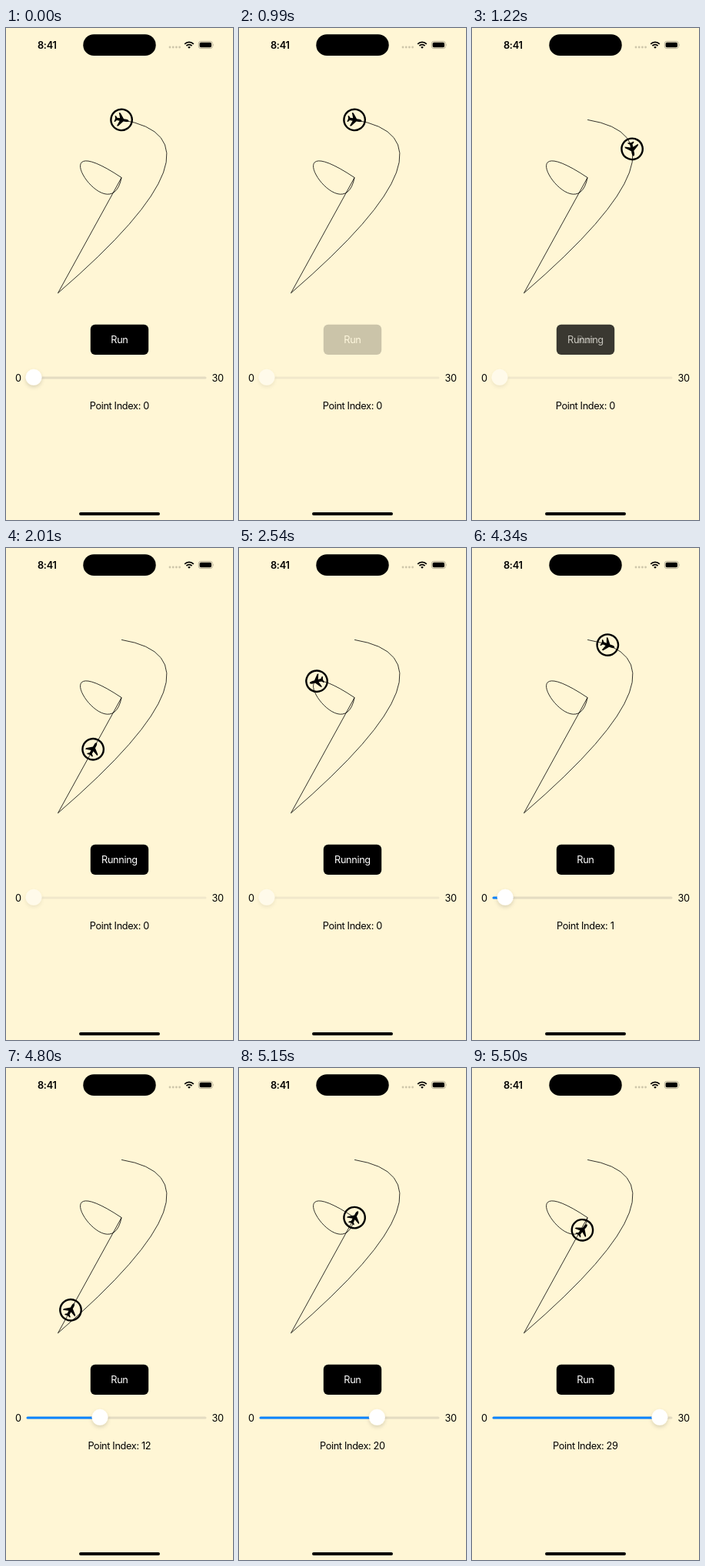
Animation of 295x640 px, one loop 6890 ms. Source, as an HTML page:

```html
<!DOCTYPE html>
<html lang="en">
<head>
<meta charset="utf-8">
<title>Path follower</title>
<style>
  html, body { margin: 0; width: 100%; height: 100%; overflow: hidden; background: #fff6d5; }
  svg { display: block; width: 295px; height: 640px; }
  text { font: 12.76px Inter, Roboto, sans-serif; letter-spacing: -.36px; text-anchor: middle; }
  #button text { fill: #fff; }
</style>
</head>
<body>
<svg viewBox="0 0 295 640">
  <defs>
    <filter id="shadow" x="-60%" y="-60%" width="220%" height="240%">
      <feDropShadow dx="0" dy="2.5" stdDeviation="2.8" flood-opacity=".15"/>
    </filter>
  </defs>

  <!-- Status bar -->
  <text x="53.3" y="26.6" style="font-weight:600; letter-spacing:-.25px">8:41</text>
  <rect x="100.3" y="8.3" width="94.4" height="27.8" rx="13.9"/>
  <g fill="#cec6aa">
    <circle cx="213" cy="25" r="1.4"/><circle cx="217.2" cy="25" r="1.4"/>
    <circle cx="221.4" cy="25" r="1.4"/><circle cx="225.6" cy="25" r="1.4"/>
  </g>
  <g fill="none" stroke="#000" stroke-width="1.8">
    <path d="M232.2 20.8a8.3 8.3 0 0 1 11.6 0M234.4 23.2a5.2 5.2 0 0 1 7.2 0"/>
    <path d="M238 26.8l-1.8-1.9a2.6 2.6 0 0 1 3.6 0z" fill="#000" stroke="none"/>
  </g>
  <rect x="250.3" y="17.4" width="18" height="9.2" rx="2.8" fill="none" stroke="#a59e88" stroke-width=".8"/>
  <rect x="251.6" y="18.7" width="15.4" height="6.6" rx="1.7"/>
  <path d="M269.5 20.5q1.3 1.5 0 3z" fill="#a59e88"/>

  <path id="route" fill="none" stroke="#000" stroke-width=".8"/>
  <g id="plane">
    <circle r="13.7" fill="none" stroke="#000" stroke-width="2.4"/>
    <path d="M9.5 0C9.5-1 7.6-1.7 6-1.7H2.7L-2.6-8.3Q-3-8.8-3.6-8.8H-4.8L-2.2-1.7H-6L-7.8-4H-9.2L-8.2 0
      L-9.2 4H-7.8L-6 1.7H-2.2L-4.8 8.8H-3.6Q-3 8.8-2.6 8.3L2.7 1.7H6C7.6 1.7 9.5 1 9.5 0Z"/>
  </g>

  <g id="button">
    <rect x="109.8" y="385.7" width="75.4" height="39.4" rx="6"/>
    <text id="run" x="147.4" y="410.2">Run</text>
    <text id="running" x="147.4" y="410.2">Running</text>
  </g>

  <text x="15.8" y="459.5">0</text>
  <text x="275.1" y="459.5">30</text>
  <g id="slider">
    <rect x="26.5" y="453.4" width="234" height="3" rx="1.5" fill="#e4dcc2"/>
    <rect id="filled" x="26.5" y="453.4" height="3" rx="1.5" fill="#0a84ff"/>
    <circle id="knob" cy="454.3" r="10.5" fill="#fff" filter="url(#shadow)"/>
  </g>
  <text id="label" x="147.3" y="495.6"></text>
  <rect x="95" y="630" width="105" height="4" rx="2"/>
</svg>
<script>
const el = id => document.getElementById(id);
const LOOP = 6890, RUN_START = 990, RUN_END = 3100, DRAG_START = 4340;
const REFRESH = 113;          // the screen updates in steps of this many ms
const MS_PER_INDEX = 65.5;    // flight speed
const INDEX_PER_REFRESH = 2.8; // drag speed

// Bezier segments, ten indices each
const start = [150.1, 119.4], corner = [67.5, 344.8], tip = [150.1, 194.6];
const segments = [
  [start, [300.2, 144], corner],
  [corner, tip],
  [tip, [37.5, 119.4], [135.1, 269.6], tip],
];
const commands = ['', '', 'L', 'Q', 'C'];
el('route').setAttribute('d', 'M' + start +
  segments.map(s => commands[s.length] + s.slice(1).join(' ')).join(''));

const clamp = (x, lo, hi) => Math.min(hi, Math.max(lo, x));
const smooth = x => x * x * (3 - 2 * x);
const refreshesSince = (begin, time) => Math.max(0, Math.floor((time - begin) / REFRESH));

function pose(index) {
  const n = clamp(Math.ceil(index / 10) - 1, 0, 2), t = index / 10 - n;
  const blend = (a, b) => a.map((v, i) => v + (b[i] - v) * t);
  let points = segments[n];
  while (points.length > 2) points = points.slice(1).map((p, i) => blend(points[i], p));
  const [a, b] = points;
  return { at: blend(a, b), angle: Math.atan2(b[1] - a[1], b[0] - a[0]) * 180 / Math.PI };
}

function draw(time) {
  const elapsed = refreshesSince(RUN_START, time) * REFRESH;
  const dragged = 1 + refreshesSince(DRAG_START, time) * INDEX_PER_REFRESH;
  const value = time < DRAG_START ? 0 : Math.min(29, Math.floor(dragged));

  const { at, angle } = pose(value || Math.min(30, elapsed / MS_PER_INDEX));
  el('plane').setAttribute('transform', `translate(${at}) rotate(${angle})`);

  const active = time >= RUN_START && time < RUN_END;
  const fade = active ? smooth(Math.min(1, elapsed / 350)) : 0;
  el('button').style.opacity = active ? .2 + .8 * fade : 1;
  el('run').style.opacity = 1 - fade;
  el('running').style.opacity = fade;

  const x = 36 + value * 7.17;
  el('slider').style.opacity = active ? .5 : 1;
  el('knob').setAttribute('cx', x);
  el('filled').setAttribute('width', value ? x - 26.5 : 0);
  el('label').textContent = 'Point Index: ' + value;
}

const loadedAt = performance.now();
function tick() {
  draw((performance.now() - loadedAt) % LOOP);
  requestAnimationFrame(tick);
}
tick();
</script>
</body>
</html>
```
